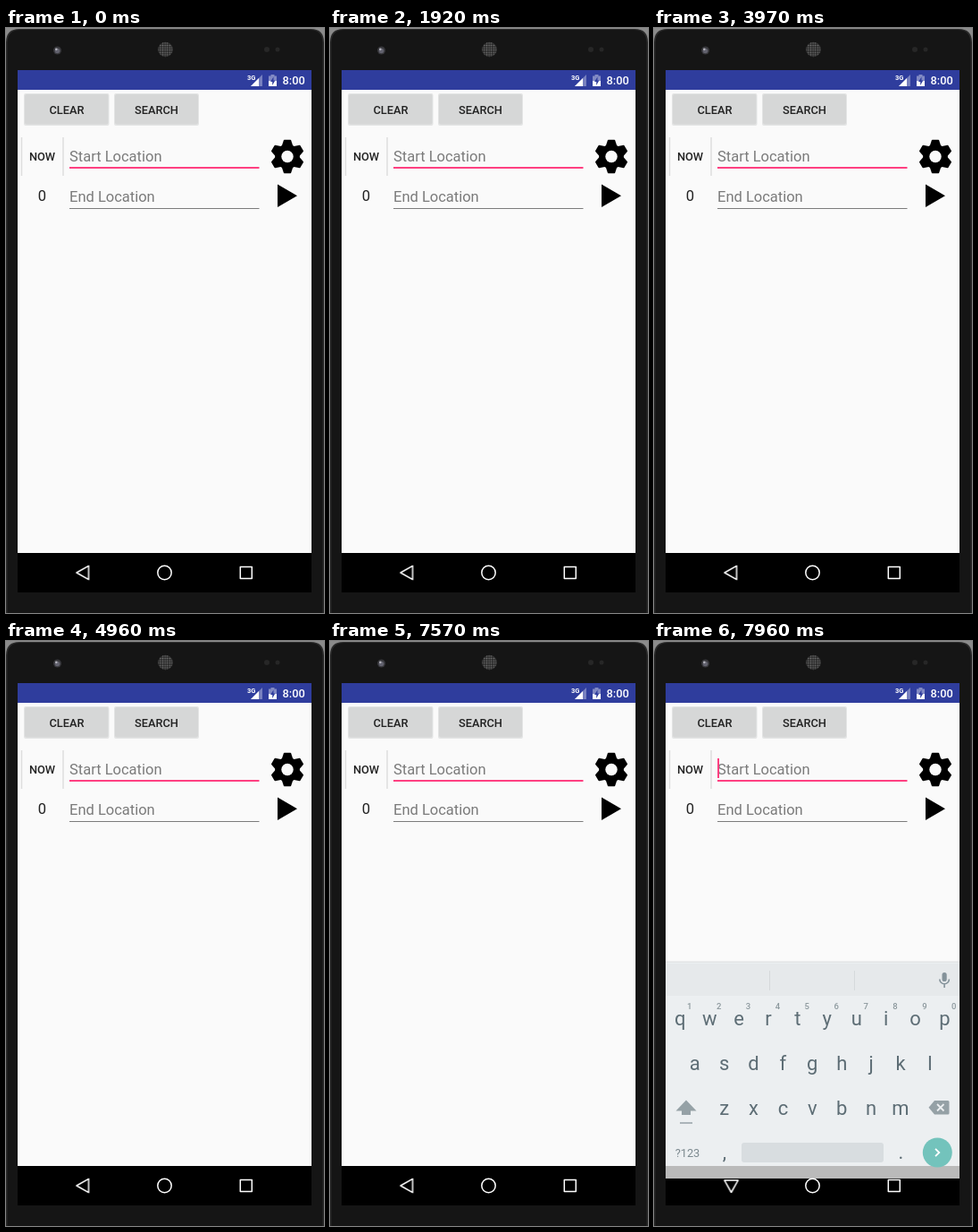
An HTML page that plays this animation: 356x653 px, repeating every 8 s.

```html
<!DOCTYPE html>
<html lang="en">
<head>
<meta charset="utf-8">
<title>Phone search form</title>
<style>
  html, body { margin: 0; width: 100%; height: 100%; overflow: hidden; background: #8b8b8b; }
  svg { display: block; font-family: Roboto, sans-serif; }
  .medium { font-weight: 500; font-size: 12.8px; fill: #222; }
  .mid { text-anchor: middle; }
  .hint { font-size: 16.5px; fill: #7b7b7b; }
  .keys { fill: #5d6d75; text-anchor: middle; font-size: 22px; }
  .keys .digit { font-size: 9.5px; fill: #8c989d; font-weight: 500; }
  .line { fill: none; stroke: #fff; stroke-width: 1.5; }
  #cursor { animation: blink 8s step-end infinite; }
  #back { animation: turn 8s step-end infinite; transform-origin: 0 0; }
  #keyboard { animation: show 8s step-end infinite; }
  @keyframes blink {
    0%, 12%, 24%, 37.625%, 49.625%, 62%, 82.25%, 94.625% { opacity: 0; }
    5%, 17.5%, 31%, 43%, 56.625%, 69%, 87.625%, 99.5%, 100% { opacity: 1; }
  }
  @keyframes turn {
    0% { transform: rotate(0deg); }
    96.125% { transform: rotate(-50deg); }
    97.625%, 100% { transform: rotate(-90deg); }
  }
  @keyframes show {
    0% { visibility: hidden; }
    99.5%, 100% { visibility: visible; }
  }
</style>
</head>
<body>
<svg width="356" height="653" viewBox="0 0 356 653">
  <defs>
    <pattern id="mesh" width="2.6" height="2.6" patternUnits="userSpaceOnUse">
      <rect width="2.6" height="2.6" fill="#242424"/>
      <circle cx="1.3" cy="1.3" r=".85" fill="#747474"/>
    </pattern>
    <path id="tooth" d="M-6.5-11L-4.2-18.1Q-4-18.7-3.4-18.7H3.4Q4-18.7 4.2-18.1L6.5-11z"/>
  </defs>

  <!-- phone body -->
  <path d="M0 653V16Q0 1 15 1H341Q356 1 356 16V653z" fill="#2b2b2b"/>
  <path d="M1.5 653V17Q1.5 2 16 2H340Q354.500 2 354.500 17V653z" fill="#151515"/>
  <circle cx="57.500" cy="25" r="4.500" fill="#38383c"/>
  <circle cx="57.500" cy="25.500" r="2.800" fill="#62626e"/>
  <circle cx="56.300" cy="23.800" r="1.300" fill="#b5b5be"/>
  <circle cx="178.500" cy="24" r="8.300" fill="url(#mesh)"/>
  <g fill="#272727"><circle cx="292" cy="24" r="3"/><circle cx="304" cy="24" r="2.500"/></g>

  <!-- screen -->
  <rect x="13" y="47" width="329" height="583"/>
  <rect x="13" y="47" width="329" height="539" fill="#fafafa"/>
  <rect x="13" y="47" width="329" height="22" fill="#2f3d9d"/>
  <g fill="#fff">
    <text x="270" y="58" font-size="7.500" font-weight="700">3G</text>
    <path d="M274 65L287 52V65z" opacity=".35"/>
    <path d="M274 65L283 56V65z"/>
    <path d="M294 53.500H296.500V52H300.500V53.500H303V65H294z" opacity=".4"/>
    <path d="M294 59H303V65H294z"/>
    <path d="M299.500 54.500L296 60H298.200V64L301.300 58.500H299.500z" fill="#2f3d9d"/>
    <text x="309.500" y="63" font-size="12.800" font-weight="500">8:00</text>
  </g>

  <!-- buttons -->
  <g fill="#e3e4e4"><rect x="20" y="73" width="95.500" height="36" rx="2"/><rect x="121" y="73" width="95" height="36" rx="2"/></g>
  <g fill="#d6d7d7"><rect x="21" y="74" width="93.500" height="33.500" rx="2"/><rect x="122" y="74" width="93" height="33.500" rx="2"/></g>
  <g class="medium mid">
    <text x="68" y="95.500">CLEAR</text>
    <text x="168.500" y="95.500">SEARCH</text>
    <text x="40.500" y="148">NOW</text>
  </g>
  <path d="M17.500 122V165M64 122V165" stroke="#dedede" stroke-width="1.500"/>

  <!-- form -->
  <text class="mid" x="40.500" y="192.500" font-size="16.500" fill="#222">0</text>
  <text class="hint" x="71" y="148.500">Start Location</text>
  <text class="hint" x="71" y="193.500">End Location</text>
  <rect x="71" y="155" width="212.500" height="2" fill="#ff4081"/>
  <rect x="71" y="201" width="212.500" height="1" fill="#7c7c7c"/>
  <rect id="cursor" x="71" y="131" width="2" height="22" fill="#ff4081"/>
  <g id="gear" transform="translate(315 143.500)"><circle r="13.800"/></g>
  <circle cx="315" cy="143.500" r="6.700" fill="#fafafa"/>
  <path d="M304 174.500L326 187.200L304 200z"/>

  <g id="keyboard">
    <rect x="13" y="357.500" width="329" height="2" fill="#e2e4e5"/>
    <rect x="13" y="359" width="329" height="227" fill="#eceff1"/>
    <rect x="13" y="360" width="329" height="36" fill="#e6e9eb"/>
    <path d="M129.500 368V390M224.500 368V390" stroke="#d5d9db"/>
    <g fill="none" stroke="#84929a" stroke-width="1.600">
      <rect x="323.300" y="370.800" width="3.600" height="8.500" rx="1.800" fill="#84929a"/>
      <path d="M319.800 377.500A5.300 5.300 0 0 0 330.400 377.500M325.100 383V387"/>
    </g>
    <g id="keys" class="keys"></g>
    <path d="M36 512.500L47.500 524.500H41V529H31V524.500H24.500zM29 537.200H43V538.800H29z" fill="#95a1a6"/>
    <path d="M314 513H329Q330.500 513 330.500 514.500V527Q330.500 528.500 329 528.500H314L307.500 520.800z" fill="#95a1a6"/>
    <path d="M317 517L324.500 524.500M324.500 517L317 524.500" stroke="#eceff1" stroke-width="1.800"/>
    <text class="mid" x="37.500" y="575.500" font-size="12.800" fill="#7b888e">?123</text>
    <rect x="98" y="560" width="159" height="22" rx="3" fill="#d8dde0"/>
    <rect x="13" y="586" width="329" height="14" fill="#bababa"/>
    <circle cx="317.300" cy="571" r="16.500" fill="#73c3bc"/>
    <path d="M315 566.800L319.300 571L315 575.200" class="line" style="stroke-width:1.800"/>
  </g>

  <!-- navigation -->
  <g class="line" stroke-linejoin="round">
    <g transform="translate(86.500 608)"><path id="back" d="M-7.500 0L6-7.700V7.700z"/></g>
    <circle cx="177.500" cy="608" r="7.700"/>
    <rect x="262.300" y="601.500" width="13" height="13"/>
  </g>
</svg>
<script>
  const pitch = 32.9;
  const label = (s, x, y, cls = "") => `<text class="${cls}" x="${x}" y="${y}">${s}</text>`;
  const row = (s, x, y, cls) => [...s].map((c, i) => label(c, x + i * pitch, y, cls)).join("");

  document.getElementById("keys").innerHTML =
    row("qwertyuiop", 29.3, 428.5) +
    row("1234567890", 39.7, 410.5, "digit") +
    row("asdfghjkl", 45.7, 478.5) +
    row("zxcvbnm", 78.6, 528.5) +
    label(",", 79, 578) + label(".", 276.5, 578);

  const gear = document.getElementById("gear");
  for (let a = 0; a < 360; a += 60)
    gear.innerHTML += `<use href="#tooth" transform="rotate(${a})"/>`;
</script>
</body>
</html>
```
